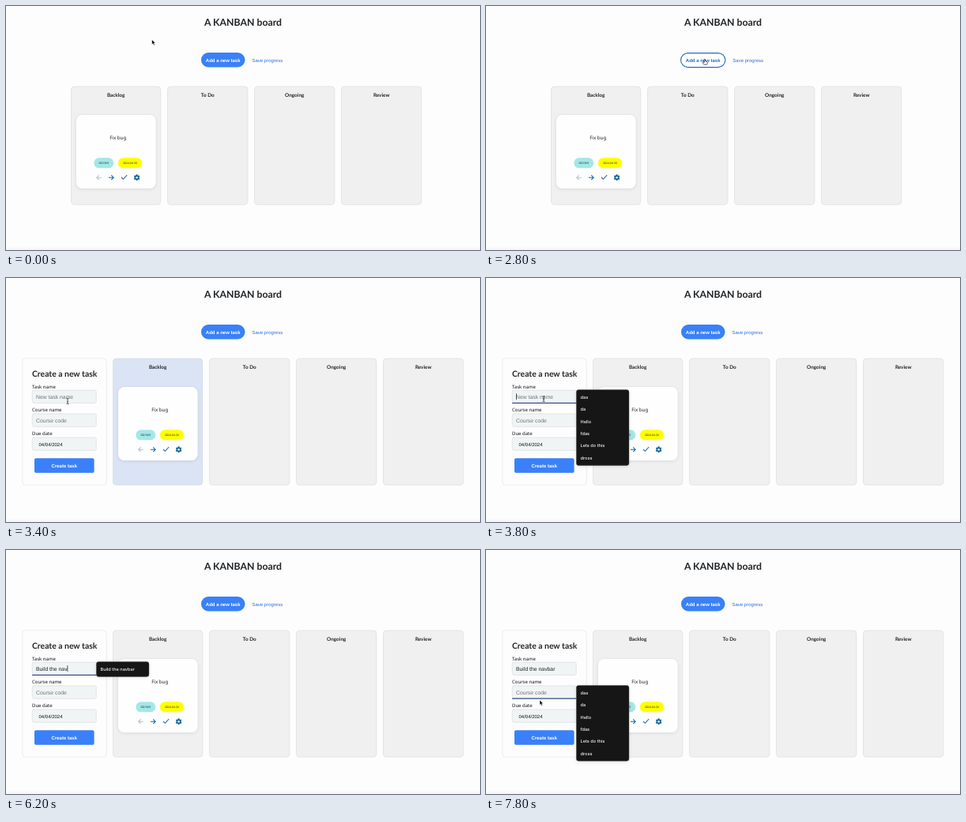
Write an HTML page that moves like this. It is 600 by 309 pixels and loops after 8 s.

```html
<!DOCTYPE html>
<html lang="en">
<head>
<meta charset="utf-8">
<title>A KANBAN board</title>
<style>
html, body { margin: 0; height: 100%; overflow: hidden; background: #fdfdfd; }
svg { display: block; text-rendering: geometricPrecision; }
text { font: 6.85px "Liberation Sans", Arial, sans-serif; fill: #222; white-space: pre; }
.title { font: bold 12.3px Lato, sans-serif; fill: #212529; text-anchor: middle; }
.head { font: bold 6.4px Lato, sans-serif; fill: #212529; text-anchor: middle; }
.form-title { font: bold 10.4px Lato, sans-serif; fill: #212529; }
.label { font: 6px "Noto Sans", sans-serif; fill: #111; }
.name { font: 6.2px "Noto Sans", sans-serif; text-anchor: middle; }
.tag { font: 3.4px "Noto Sans", sans-serif; text-anchor: middle; }
.button { font-size: 6px; font-weight: bold; fill: #fff; text-anchor: middle; }
.link { font-size: 6px; fill: #2a6fe0; }
.hint { fill: #6f7577; }
.date { font-size: 6px; fill: #111; }
.option { font: 500 5.6px Inter, sans-serif; fill: #f2f2f2; }
.icon { fill: none; stroke: #17699c; stroke-width: 1.1; }
</style>
</head>
<body>
<svg id="stage" width="600" height="309" viewBox="0 0 600 309">
  <defs>
    <filter id="shadow" x="-20%" y="-20%" width="140%" height="140%">
      <feDropShadow dx="0" dy="1" stdDeviation="2" flood-color="#000" flood-opacity=".1"/>
    </filter>
    <linearGradient id="edge" x2="0" y2="1">
      <stop stop-color="#fdfdfd"/><stop offset="1" stop-color="#f5f5f5"/>
    </linearGradient>
  </defs>
  <rect y="304" width="600" height="5" fill="url(#edge)"/>
  <text class="title" x="300" y="25">A KANBAN board</text>
  <g id="scene"></g>
</svg>
<script>
const LOOP = 8000, TICK = 200, BLUE = '#3a80f8';
const TASK = 'Build the navbar';
const HISTORY = ['das', 'da', 'Hello', 'fdas', 'Lets do this', 'dross'];
const TYPED = [1, 1, 1, 2, 3, 5, 7, 9, 11, 13, 15, 16]; // characters per tick
const TYPE_START = 4400;

// [start time, x, y, shape]
const POINTER = [
  [0, 184.7, 42.5, 'arrow'], [800, 195, 39, 'arrow'], [1000, 217, 50, 'arrow'],
  [1200, 244, 70, 'arrow'], [1400, 268, 79, 'arrow'], [1600, 277, 73, 'hand'],
  [1800, 277, 70.5, 'hand'], [3000, 196, 112, 'arrow'], [3200, 95.7, 165, 'arrow'],
  [3400, 78, 156, 'beam'], [3600, 73, 153, 'beam'], [TYPE_START, 0, 0, 'none'],
  [6800, 73, 154, 'beam'], [7000, 72, 164, 'arrow'], [7200, 72, 180, 'beam'],
  [7600, 70, 184, 'beam'], [7800, 68, 190, 'arrow']
];
const SHAPES = {
  none: '',
  arrow: '<path d="M0 0V6.2L1.4 5L2.4 7.3L3.5 6.8L2.5 4.6H4.4Z" fill="#000" stroke="#fff" stroke-width=".5"/>',
  hand: '<path d="M-.8-3Q0-3.8 .5-3V-.6L2.9 0Q3.6 .3 3.4 1.4L2.7 3.7H-1L-2.9 1Q-2.6 .1-1.6 .7L-.8 1.3Z" fill="#fff" stroke="#222" stroke-width=".7"/>',
  beam: '<path d="M-1.5-3.5Q0-3.5 0-2.7Q0-3.5 1.5-3.5M0-2.7V2.7M-1.5 3.5Q0 3.5 0 2.7Q0 3.5 1.5 3.5M-.8 .7H.8" fill="none" stroke="#222" stroke-width=".7"/>'
};

const pen = document.createElement('canvas').getContext('2d');
pen.font = '6.85px "Liberation Sans", Arial, sans-serif';

const box = (x, y, w, h, r, fill, extra = '') =>
  `<rect x="${x}" y="${y}" width="${w}" height="${h}" rx="${r}" fill="${fill}" ${extra}/>`;
const label = (kind, x, y, words, extra = '') =>
  `<text class="${kind}" x="${x}" y="${y}" ${extra}>${words}</text>`;

function toolbar(hover) {
  return (hover
    ? box(246.6, 59.6, 56.3, 18, 9, '#fff', 'stroke="#2468c8" stroke-width="1.1"')
    : box(247, 59, 55.5, 18.5, 9.25, BLUE)) +
    label('button', 274.7, 70.6, 'Add a new task', hover ? 'style="fill:#2468d8"' : '') +
    label('link', hover ? 312.3 : 311.5, 70.6, 'Save progress');
}

function gear(x, y) {
  const teeth = [0, 60, 120].map(a =>
    `<rect x="-1" y="-3.9" width="2" height="7.8" rx=".4" transform="rotate(${a})"/>`).join('');
  return `<g transform="translate(${x} ${y})" fill="#17699c">${teeth}<circle r="2.9"/><circle r="1.2" fill="#fff"/></g>`;
}

function card() {
  return box(89, 138, 100.5, 93, 8, '#fefefe', 'filter="url(#shadow)"') +
    label('name', 141.7, 169, 'Fix bug') +
    box(111.3, 192.3, 25, 13, 6.5, '#a4e7e6') + label('tag', 123.8, 200, 'DD1369') +
    box(141.7, 192.3, 30.5, 13, 6.5, '#ff0') + label('tag', 157, 200, '2024-04-30') +
    '<path class="icon" style="stroke:#b4c3cd" d="M121 217.2H115M117.7 214.3L114.8 217.2L117.7 220.1"/>' +
    '<path class="icon" d="M130 217.2H136M133.3 214.3L136.2 217.2L133.3 220.1"/>' +
    '<path class="icon" d="M146 217L148.4 219.3L153.2 214"/>' +
    gear(165.6, 217.2);
}

function board(open, glow) {
  const height = open ? 160.3 : 149.7;
  const columns = [['Backlog', 82.5, 113.3], ['To Do', 204.5, 101.5], ['Ongoing', 314.5, 101.5], ['Review', 424.5, 101.5]]
    .map(([name, x, w], i) =>
      box(x, 101.9, w, height, 4, '#f0f0f0', 'stroke="#dedede" stroke-width=".7"') +
      (i ? '' : box(x, 101.9, w, height, 4, '#a8c7fc', `opacity="${glow}"`)) +
      label('head', x + w / 2, 114.8, name)).join('');
  return `<g transform="translate(${open ? 53 : 0})">${columns}${card()}</g>`;
}

function field(title, y, content, focused) {
  return label('label', 33, y - 2.6, title) +
    box(33.2, y, 81, 16.3, 2, '#f0f4f4', 'stroke="#d8dede" stroke-width=".7"') +
    (focused ? box(33, y + 15.6, 81.4, 1.2, .5, '#34508c') : '') + content;
}

function form(t, typed) {
  const inTask = t >= 3800 && t < 7400, inCourse = t >= 7400;
  const caret = inTask ? box(38 + pen.measureText(typed).width, 146.2, .7, 7.8, 0, '#111') : '';
  const task = typed ? label('', 38, 152.6, typed) : label('hint', 38, 152.6, 'New task name');
  return box(20.8, 101.9, 106.4, 160.3, 4, '#fdfdfd', 'stroke="#e6e6e6" stroke-width=".7"') +
    label('form-title', 33, 124.6, 'Create a new task') +
    field('Task name', 142.1, task + caret, inTask) +
    field('Course name', 172, label('hint', 38, 182.6, 'Course code'), inCourse) +
    field('Due date', 202, label('date', 41.5, 212.5, '04/04/2024'), false) +
    box(36, 228.3, 75.6, 18.4, 2, BLUE) +
    label('button', 73.8, 239.6, 'Create task');
}

function menu(y, options) {
  return box(114.3, y, 66.7, 3.6 + 15.38 * options.length, 3, '#171717',
    'stroke="#555" stroke-width=".4" filter="url(#shadow)"') +
    options.map((name, i) => label('option', 119.5, y + 11.4 + 15.38 * i, name)).join('');
}

function suggestions(t, typed) {
  if (t >= 7400) return menu(171.4, HISTORY);
  if (t < 3800 || typed === TASK) return '';
  return menu(141.5, typed ? [TASK] : HISTORY);
}

function scene(t) {
  const open = t >= 3000;
  const hover = t >= 1600 && !open;
  const glow = { 3000: .5, 3200: 1, 3400: .3 }[t] || 0;
  const step = Math.min((t - TYPE_START) / TICK, TYPED.length - 1);
  const typed = TASK.slice(0, TYPED[step] || 0);
  const [, x, y, shape] = POINTER.findLast(p => p[0] <= t);
  return toolbar(hover) + board(open, glow) +
    (open ? form(t, typed) + suggestions(t, typed) : '') +
    `<g transform="translate(${x} ${y})">${SHAPES[shape]}</g>`;
}

const layer = document.getElementById('scene');
let shown = -1;
function frame() {
  const t = Math.floor(performance.now() % LOOP / TICK) * TICK;
  if (t !== shown) layer.innerHTML = scene(shown = t);
  requestAnimationFrame(frame);
}
frame();
</script>
</body>
</html>
```
